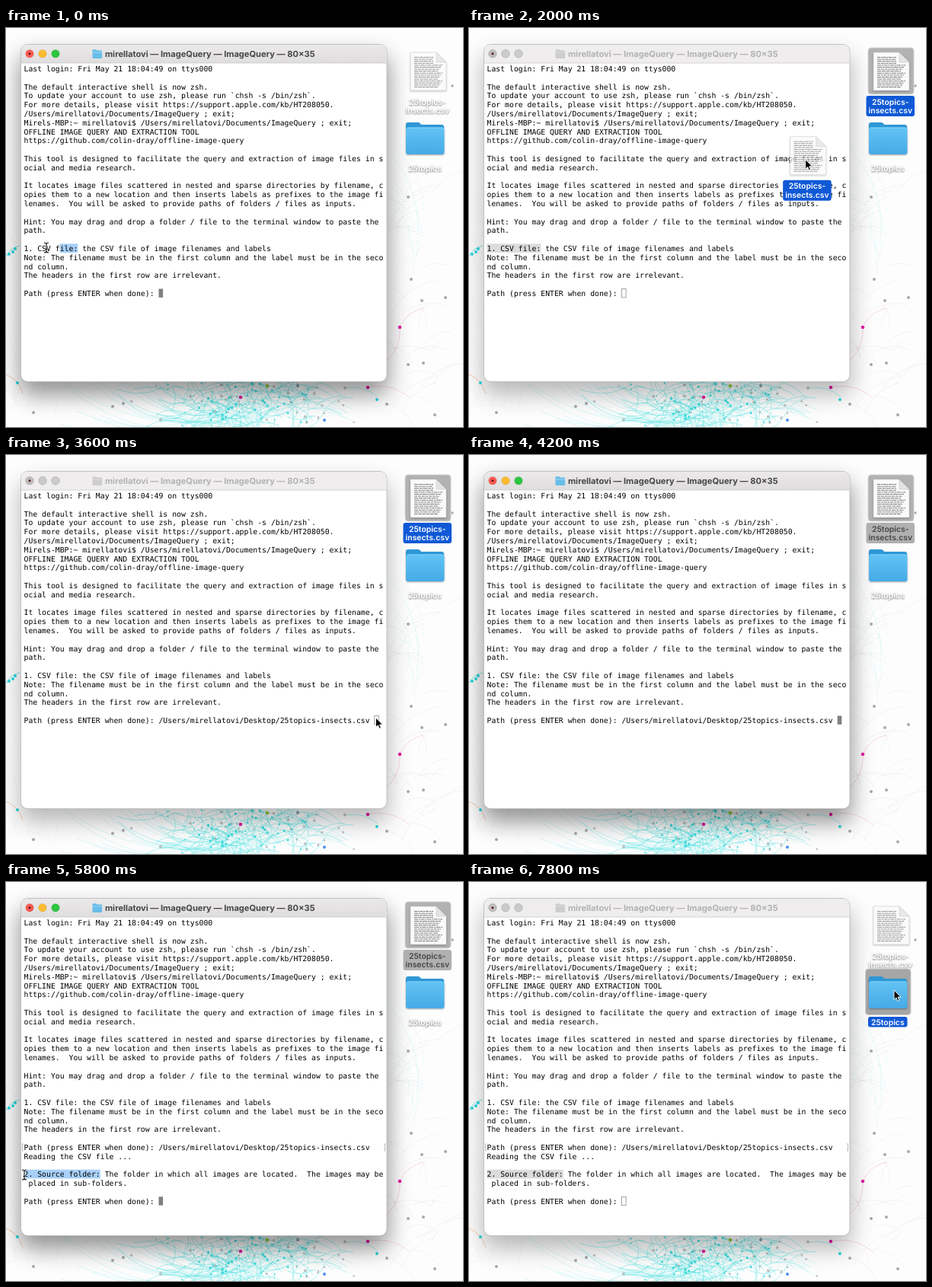
Write an HTML page that moves like this. It is 600 px wide and 524 px high and loops after 8 s.

```html
<!DOCTYPE html>
<html lang="en">
<head>
<meta charset="utf-8">
<title>Image query session</title>
<style>
  html, body { margin: 0; width: 100%; height: 100%; overflow: hidden; background: #fdfdfd; }
  svg { display: block; width: 100vw; height: 100vh; }
  text { text-rendering: geometricPrecision; white-space: pre; }
  .term { font: 9.8px "DejaVu Sans Mono", monospace; fill: #000; }
  .title { font: 700 11.1px Inter, sans-serif; }
  .label { font: 600 10.4px Inter, sans-serif; text-anchor: middle; fill: #fff; }
  .plain { filter: drop-shadow(0 1px 1px rgba(0, 0, 0, .6)); }
</style>
</head>
<body>
<svg viewBox="0 0 600 524" preserveAspectRatio="none">
  <defs>
    <filter id="blur" x="-20%" y="-20%" width="140%" height="140%"><feGaussianBlur stdDeviation="15"/></filter>
    <filter id="soft" x="-20%" y="-20%" width="140%" height="140%"><feDropShadow dx="0" dy="1" stdDeviation="1" flood-opacity=".35"/></filter>
    <linearGradient id="bar" x2="0" y2="1"><stop stop-color="#ebe9e9"/><stop offset="1" stop-color="#dfdddd"/></linearGradient>
    <linearGradient id="blue" x2="0" y2="1"><stop stop-color="#62c3f4"/><stop offset="1" stop-color="#46aae6"/></linearGradient>
    <g id="paper">
      <path d="M531 32H565L578 45V82H531Z" fill="#fafafa" stroke="#c4c4c4" stroke-width=".6" filter="url(#soft)"/>
      <path d="M565 32V45H578Z" fill="#e4e4e4" stroke="#bbb" stroke-width=".5"/>
      <g id="print" fill="none" stroke="#777" stroke-width="1"></g>
    </g>
    <g id="folder" filter="url(#soft)">
      <path d="M525 127q0-3 3-3H541q2 0 3 1.500l1 1.500H572q3 0 3 3V150H525Z" fill="#2f97d6"/>
      <rect x="525" y="130.500" width="50.500" height="35.500" rx="3" fill="url(#blue)"/>
      <path d="M527 131H573" stroke="#8fd6fa" stroke-width=".8"/>
    </g>
    <path id="arrow" d="M0 0V12.500L2.900 9.800L4.900 14.300L6.900 13.400L5 9.100H9Z" fill="#000" stroke="#fff" stroke-width=".9"/>
    <g id="ibeam" fill="none">
      <path id="beam" d="M-3-6Q0-6 0-4Q0-6 3-6M0-4V5M-3 7Q0 7 0 5Q0 7 3 7M-1.500 2.500H1.500" stroke="#fff" stroke-width="2.600"/>
      <path d="M-3-6Q0-6 0-4Q0-6 3-6M0-4V5M-3 7Q0 7 0 5Q0 7 3 7M-1.500 2.500H1.500" stroke="#111" stroke-width="1.100"/>
    </g>
    <path id="resize" d="M-6.500 0L-2.500-3.800V-1H2.500V-3.800L6.500 0L2.500 3.800V1H-2.500V3.800Z" fill="#000" stroke="#fff" stroke-width=".8"/>
  </defs>

  <rect width="600" height="524" fill="#fdfdfd"/>
  <g id="net" fill="none"></g>
  <rect id="shade" x="18" y="36" width="484" height="446" rx="12" filter="url(#blur)"/>

  <rect x="19.500" y="21.500" width="480.500" height="443" rx="9" fill="#fff" stroke="#b4b4b4" stroke-width=".8"/>
  <path id="head" d="M20 46V31Q20 22 29 22H490.500Q499.500 22 499.500 31V46Z"/>
  <path d="M20 46H499.500" stroke="#c9c9c9" stroke-width=".8"/>
  <path id="drop" d="M20.500 46.500H499V455Q499 463.500 490 463.500H29.500Q20.500 463.500 20.500 455Z" fill="none" stroke="#7fb4ea" stroke-width="1.200"/>
  <g id="lights" stroke-width=".6"></g>
  <circle cx="31" cy="33.700" r="1.500" fill="#5c1512"/>
  <g id="proxy">
    <path d="M113.500 29.500q0-1.300 1.300-1.300h3.700l1.300 1.400h5q1.300 0 1.300 1.300V39q0 1-1 1H114.500q-1 0-1-1Z" fill="#69bde9"/>
    <path d="M113.500 32H126" stroke="#a8dcf6" stroke-width=".8"/>
  </g>
  <text id="title" class="title" x="130" y="37.600"></text>
  <rect id="select" height="11.800"/>
  <rect id="caret" width="5.600" height="11.400"/>
  <g id="rows" class="term"></g>
  <g id="marks" fill="none" stroke="#aaa" stroke-width=".8"><path d="M23 344H21.500V353H23M496 344H497.500V353H496"/></g>

  <circle cx="586" cy="76" r="1.700" fill="#aaa"/>
  <rect id="fileBox" x="524" y="26" width="60" height="61" rx="4" fill="#b2b2b2" stroke="#d2d2d2"/>
  <use id="file" href="#paper"/>
  <rect id="fileTag" x="521.500" y="89" width="63.500" height="27" rx="3"/>
  <g id="fileName" class="label"><text x="553.300" y="100.600">25topics-</text><text x="553.300" y="112.400">insects.csv</text></g>
  <rect id="dirBox" x="520.500" y="114" width="59.500" height="60.500" rx="4" fill="#a6a6a6" stroke="#cecece"/>
  <use href="#folder"/>
  <rect id="dirTag" x="524" y="177" width="51.500" height="13.500" rx="3" fill="#1059d6"/>
  <text id="dirName" class="label" x="549.800" y="187.500">25topics</text>

  <g id="ghost">
    <use href="#paper" opacity=".75"/>
    <rect x="521.500" y="89" width="63.500" height="27" rx="3" fill="#1059d6"/>
    <g class="label"><text x="553.300" y="100.600">25topics-</text><text x="553.300" y="112.400">insects.csv</text></g>
  </g>
  <use id="pointer"/>
  <g id="badge">
    <circle r="7.800" fill="#35a52f" stroke="#e4f4e2" stroke-width=".8"/>
    <path d="M-4 0H4M0-4V4" stroke="#fff" stroke-width="2"/>
  </g>
</svg>
<script>
const LOOP = 8000, STEP = 200, CW = 5.9, LH = 11.8, LEFT = 23.5;
const USER = 'mirellatovi';
const PROMPT = 'Path (press ENTER when done): ';
const PATH = `/Users/${USER}/Desktop/25topics-insects.csv `;
const LINES = `Last login: Fri May 21 18:04:49 on ttys000

The default interactive shell is now zsh.
To update your account to use zsh, please run \`chsh -s /bin/zsh\`.
For more details, please visit https://support.apple.com/kb/HT208050.
/Users/${USER}/Documents/ImageQuery ; exit;
Mirels-MBP:~ ${USER}$ /Users/${USER}/Documents/ImageQuery ; exit;
OFFLINE IMAGE QUERY AND EXTRACTION TOOL
https://github.com/colin-dray/offline-image-query

This tool is designed to facilitate the query and extraction of image files in s
ocial and media research.

It locates image files scattered in nested and sparse directories by filename, c
opies them to a new location and then inserts labels as prefixes to the image fi
lenames.  You will be asked to provide paths of folders / files as inputs.

Hint: You may drag and drop a folder / file to the terminal window to paste the
path.

1. CSV file: the CSV file of image filenames and labels
Note: The filename must be in the first column and the label must be in the seco
nd column.
The headers in the first row are irrelevant.

${PROMPT}
Reading the CSV file ...

2. Source folder: The folder in which all images are located.  The images may be
 placed in sub-folders.

${PROMPT}`.split('\n');

// Event times in ms
const T = { grab: 1600, drag: 1800, over: 2400, drop: 3000, focus: 3800, enter: 4400, mark: 5200, leave: 7400 };

// Pointer stops: time, x, y, shape used from that time on
const STOPS = [
  [0, 53, 288, 'ibeam'], [200, 28, 289, 'ibeam'], [400, 24, 289, 'ibeam'],
  [800, 32, 286, 'ibeam'], [1200, 499.5, 68, 'resize'], [1400, 545, 63, 'arrow'],
  [1600, 551, 61, 'arrow'], [1800, 540, 74, 'arrow'], [2400, 245, 370, 'arrow'],
  [2600, 223, 391, 'arrow'], [3000, 224, 390, 'arrow'], [3600, 485.5, 345, 'arrow'],
  [3800, 486, 346, 'ibeam'], [4000, 486, 346, ''], [5000, 160, 388, 'ibeam'],
  [5200, 124, 384, 'ibeam'], [5800, 24, 384, 'ibeam'], [6200, 60, 372, 'ibeam'],
  [6600, 423, 199, 'ibeam'], [7000, 535, 152, 'arrow'], [7400, 558, 142, 'arrow'],
  [8000, 558, 142, 'arrow']
];

const $ = id => document.getElementById(id);
const set = (node, attrs) => { for (const k in attrs) node.setAttribute(k, attrs[k]); return node; };
const add = (parent, tag, attrs) =>
  parent.appendChild(set(document.createElementNS('http://www.w3.org/2000/svg', tag), attrs));
const show = (id, on) => set($(id), { visibility: on ? 'visible' : 'hidden' });
const rowTop = r => 47.3 + r * LH;

let seed = 17;
const rnd = () => (seed = seed * 16807 % 2147483647) / 2147483647;
const span = (a, b) => a + (b - a) * rnd();
const bell = w => (rnd() + rnd() + rnd() - 1.5) * w;

function buildNet() {
  const net = $('net');
  const curve = (x, y, x2, y2, stroke, opacity, dash) => add(net, 'path', {
    d: `M${x} ${y}Q${(x + x2) / 2 + (y2 - y) * .25} ${(y + y2) / 2 - (x2 - x) * .25} ${x2} ${y2}`,
    stroke, opacity, 'stroke-width': .7, 'stroke-dasharray': dash || 'none'
  });
  const dot = (cx, cy, r, fill, opacity = 1) => add(net, 'circle', { cx, cy, r, fill, opacity });

  for (let i = 0; i < 30; i++) {
    const x = span(495, 560), y = span(180, 520);
    curve(x, y, x + span(10, 70), y + span(-50, 40), '#999', .35, '1 1.5');
  }
  for (let i = 0; i < 12; i++) curve(span(495, 510), span(140, 330), span(520, 550), span(230, 350), '#5fe3e3', .5, '1 3');
  for (let i = 0; i < 12; i++) curve(0, span(200, 520), span(8, 70), span(440, 520), '#aaa', .3, '1 2');
  for (let i = 0; i < 60; i++) curve(310 + bell(60), 500 + bell(20), span(60, 470), span(455, 526), '#48dede', .4, '2 1');
  for (let i = 0; i < 190; i++) {
    const x = 308 + bell(105), y = 492 + bell(45);
    curve(x, y, x + bell(70), y + bell(45), '#35dcdc', .55);
    if (i % 3 == 0) dot(x, y, span(.8, 1.8), '#2fd9dc', .9);
  }
  for (let i = 0; i < 35; i++) dot(span(160, 480), span(465, 522), span(1, 2), '#aaa', .7);

  curve(517, 393, 548, 368, '#f08fc8', .8, '2 1');
  curve(517, 393, 496, 440, '#f08fc8', .8, '2 1');
  curve(475, 472, 530, 486, '#f08fc8', .7, '2 1');
  curve(0, 455, 22, 480, '#f0a070', .8);
  curve(0, 300, 18, 286, '#35dcdc', .9);
  [[546, 358], [577, 354], [532, 330], [528, 222], [548, 440], [528, 442], [563, 508], [36, 505],
   [140, 497], [154, 493], [500, 494]].forEach(p => dot(...p, 2, '#a8a8a8'));
  [[4, 297], [12, 290], [9, 294], [15, 466], [487, 488]].forEach(p => dot(...p, 2, '#27d8de'));
  [[517, 393], [475, 472], [308, 485]].forEach(p => dot(...p, 2.3, '#e01ca4'));
  dot(343, 470, 2.3, '#9cc832');
  dot(383, 470, 2, '#8a9fae');
  dot(418, 515, 2, '#4a8ff0');
  dot(324, 510, 5, '#eefafa', .8);
}

function buildStatic() {
  for (let i = 0; i < 16; i++) {
    const y = 38.5 + i * 2.6;
    add($('print'), 'path', {
      d: `M536 ${y}H${i < 4 ? 561 : 573 - (i % 4) * 2}`,
      'stroke-dasharray': `${4 + i % 3} .8 ${2 + i % 4} .7`
    });
  }
  [31, 48, 65].forEach(cx => add($('lights'), 'circle', { cx, cy: 33.7, r: 5.3 }));
  LINES.forEach((s, r) => add($('rows'), 'text', { x: LEFT, y: 57 + r * LH }).textContent = s);
  $('title').textContent = `${USER} — ImageQuery — ImageQuery — 80×35`;
}

function pointerAt(t) {
  const i = Math.max(0, STOPS.findIndex(s => s[0] > t) - 1);
  const [t0, x0, y0, shape] = STOPS[i], [t1, x1, y1] = STOPS[i + 1];
  const k = (t - t0) / (t1 - t0);
  return { x: x0 + (x1 - x0) * k, y: y0 + (y1 - y0) * k, shape };
}

function drawWindow(t) {
  const active = t < T.grab || (t >= T.focus && t < T.leave);
  set($('shade'), { opacity: active ? .42 : .27 });
  set($('head'), { fill: active ? 'url(#bar)' : '#efeded' });
  const hues = active ? ['#fb5b53', '#fcbb2f', '#2cc63f'] : ['#bdbdbd', '#cbcbcb', '#cbcbcb'];
  [...$('lights').children].forEach((c, i) => set(c, { fill: hues[i], stroke: active ? '#0002' : '#aaa' }));
  set($('proxy'), active ? { opacity: 1, style: '' } : { opacity: .5, style: 'filter:grayscale(1)' });
  set($('title'), { fill: active ? '#474747' : '#b3b3b3' });
  show('drop', t >= T.over && t < T.drop);

  const done = t >= T.enter;
  [...$('rows').children].forEach((n, r) => r > 25 && set(n, { visibility: done ? 'visible' : 'hidden' }));
  $('rows').children[25].textContent = PROMPT + (t >= T.drop ? PATH : '');
  show('marks', done);
  const col = t >= T.drop && !done ? 78 : 30;
  set($('caret'), {
    x: LEFT + col * CW, y: rowTop(done ? 31 : 25) + .2,
    fill: active ? '#808080' : 'none', stroke: active ? 'none' : '#999', 'stroke-width': .9
  });

  let row = 20, from = t < STEP ? 8 : 0, to = 12;
  if (t >= T.mark) {
    row = 28;
    to = 17;
    from = Math.max(0, Math.round(17 * (1 - (t - T.mark) / 600)));
  }
  show('select', t < T.drop || t >= T.mark);
  set($('select'), {
    x: LEFT + from * CW, y: rowTop(row), width: (to - from) * CW, fill: active ? '#a8d0f8' : '#dcdcdc'
  });
}

function drawDesktop(t) {
  const picked = t >= T.grab && t < T.leave, dir = t >= T.leave, front = t < T.focus;
  show('fileBox', picked);
  show('fileTag', picked);
  set($('file'), { opacity: picked ? 1 : .8 });
  set($('fileTag'), { fill: front ? '#1059d6' : '#b0b0b0' });
  $('fileName').classList.toggle('plain', !picked);
  $('fileName').querySelectorAll('text').forEach(n => set(n, { fill: picked && !front ? '#454545' : '#fff' }));
  show('dirBox', dir);
  show('dirTag', dir);
  $('dirName').classList.toggle('plain', !dir);
}

function drawPointer(t) {
  const { x, y, shape } = pointerAt(t), over = t >= T.over && t < T.drop;
  show('pointer', shape);
  if (shape) set($('pointer'), { href: '#' + shape, transform: `translate(${x} ${y})` });
  show('ghost', t >= T.drag && t < T.drop);
  set($('ghost'), { transform: `translate(${x - 551} ${y - 62})` });
  show('badge', over);
  set($('badge'), { transform: `translate(${x + 8} ${y + 18.5})` });
}

function frame(now) {
  const t = Math.floor(now % LOOP / STEP) * STEP;
  drawWindow(t);
  drawDesktop(t);
  drawPointer(t);
  requestAnimationFrame(frame);
}

buildNet();
buildStatic();
frame(performance.now());
</script>
</body>
</html>
```
